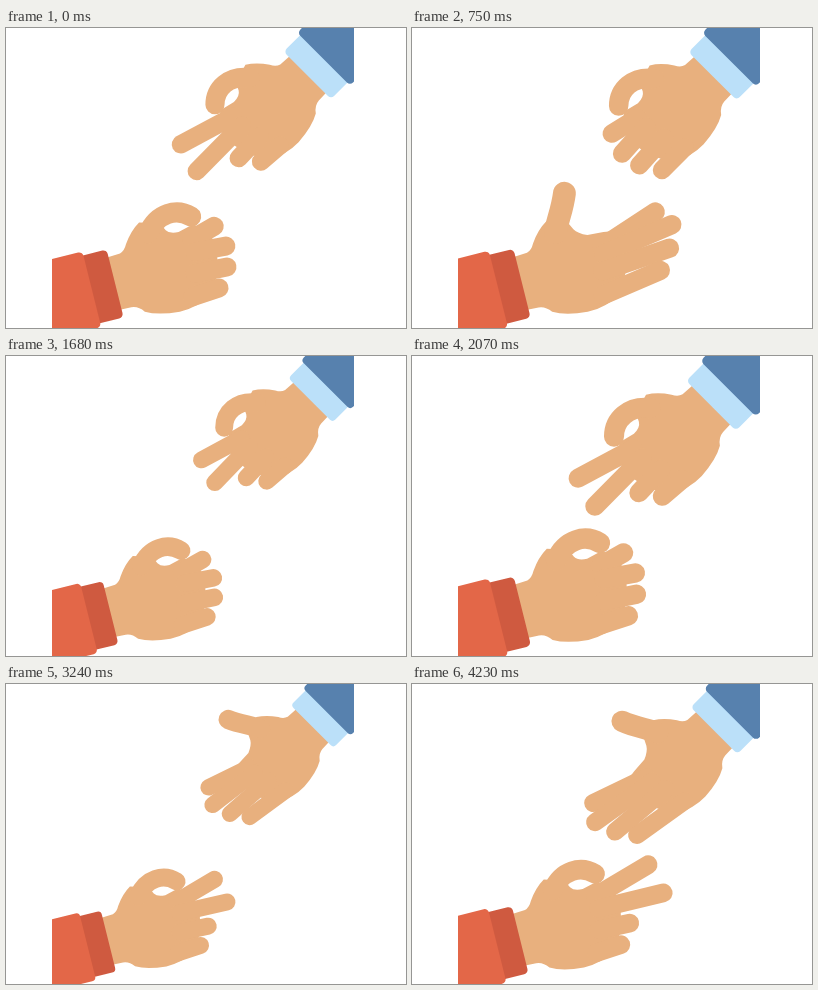
These frames come from a looping animation (400 px wide and 300 px high, 4.53 s). An HTML page with a canvas:

```html
<!DOCTYPE html>
<html lang="en">
<head>
<meta charset="utf-8">
<title>Rock paper scissors</title>
<style>
html, body { margin: 0; width: 100%; height: 100%; overflow: hidden; background: #fff; }
canvas { display: block; width: 400px; height: 300px; }
</style>
</head>
<body>
<canvas id="stage" width="400" height="300"></canvas>
<script>
const ctx = document.getElementById('stage').getContext('2d');
const LOOP = 4530, LAST = 4230, STEP = 30;
const SKIN = '#e8b07e';

// Fingertips from index to little finger, wrist at the origin
const TIPS = {
  rock: [[110, -31], [116.5, -9], [112.5, 11.5], [99.7, 30]],
  loose: [[115, -31], [122, -9], [118, 12], [105, 32]],
  paper: [[145, -36], [158, -20], [150, 2], [136, 21]],
  scissors: [[144.5, -42], [152.5, -10.5], [112, 11], [98, 30]]
};
const BASES = [[85, -24], [85, -11], [80, 10], [72, 32]];
const FLAT_BASES = [[85, -15], [85, -8], [80, 8], [75, 31]];
const BENT_THUMB = [[44, -40], [58, -58], [78, -58], [90, -46]];
const OPEN_THUMB = [[44, -40], [48, -50], [56, -60], [62, -75.5]];

// keys: time, size, how far the fingers are out
const red = {
  x: 46, y: 271.5, wrist: [63, -16.5], turn: -14, size: 1, flip: 1,
  sleeve: '#e36748', cuff: '#cf5a40',
  poses: [[0, 'rock'], [190, 'paper'], [1330, 'rock'], [2700, 'scissors']],
  keys: [
    [0, 1, 1], [190, 0.1, 0], [390, 0.895, 0.5], [650, 1.02, 1], [900, 0.99, 0.9],
    [1170, 0.64, 0.17], [1330, 0.1, 0], [1620, 0.9, 0.6], [2070, 1.02, 1],
    [2400, 0.97, 0.9], [2700, 0.1, 0], [2760, 0.26, 0], [3120, 0.85, 0.5],
    [3600, 0.965, 0.9], [4230, 0.985, 1]
  ]
};
const blue = {
  x: 348, y: 0, wrist: [-47, 47], turn: 135, size: 0.957, flip: -1,
  sleeve: '#5781ae', cuff: '#bbe0f9',
  poses: [[0, 'scissors'], [190, 'loose'], [1330, 'scissors'], [2700, 'paper']],
  keys: [
    [0, 1, 1], [190, 0.15, 0], [390, 0.82, 1], [650, 1.02, 1], [900, 1, 1],
    [1170, 0.71, 1], [1330, 0.15, 0], [1620, 0.9, 0.6], [2070, 1.05, 1],
    [2400, 0.98, 0.9], [2700, 0.15, 0], [2760, 0.35, 0.2], [3120, 0.86, 0.6],
    [3600, 0.96, 0.97], [4230, 0.985, 1]
  ]
};

const mix = (a, b, k) => a + (b - a) * k;
const mixPt = (a, b, k) => [mix(a[0], b[0], k), mix(a[1], b[1], k)];

// Smooth curve through the keys, flat at every turning point
function track(keys, t, col) {
  let i = 0;
  while (i < keys.length - 2 && t >= keys[i + 1][0]) i++;
  const rate = j => keys[j] && keys[j + 1]
    ? (keys[j + 1][col] - keys[j][col]) / (keys[j + 1][0] - keys[j][0]) : 0;
  const slope = j => {
    const a = rate(j - 1), b = rate(j);
    return a * b > 0 ? 2 * a * b / (a + b) : 0;
  };
  const [a, b] = [keys[i], keys[i + 1]];
  const d = b[0] - a[0], u = (t - a[0]) / d, w = 1 - u;
  return (1 + 2 * u) * w * w * a[col] + u * w * w * d * slope(i)
    + u * u * (3 - 2 * u) * b[col] - u * u * w * d * slope(i + 1);
}

function box(x, y, w, h, color) {
  ctx.fillStyle = color;
  ctx.beginPath();
  ctx.roundRect(x, y, w, h, 4.5);
  ctx.fill();
}

function palm(open) {
  ctx.beginPath();
  ctx.moveTo(-5, -26.5);
  ctx.lineTo(12, -27.5);
  ctx.quadraticCurveTo(17, -29, 20, -35);
  ctx.quadraticCurveTo(28, -47, 38, -53);
  ctx.lineTo(58, -47);
  ctx.lineTo(62, -39);
  ctx.quadraticCurveTo(65, -34, 74, mix(-34, -30, open));
  ctx.lineTo(90, mix(-38, -29, open));
  ctx.lineTo(104, -27);
  ctx.lineTo(107, -8);
  ctx.lineTo(103, 12);
  ctx.lineTo(92, 34);
  ctx.quadraticCurveTo(74, 44, 56, 43.5);
  ctx.quadraticCurveTo(34, 42, 22, 35);
  ctx.quadraticCurveTo(17, 28, 10, 27.5);
  ctx.lineTo(-5, 27);
  ctx.fill();
}

function hand(pose, out) {
  const flat = pose === 'paper' ? out : 0;
  const open = 1 - (1 - flat) ** 2.5;
  ctx.fillStyle = ctx.strokeStyle = SKIN;
  ctx.lineCap = ctx.lineJoin = 'round';
  palm(open);

  ctx.lineWidth = 19;
  BASES.forEach((base, i) => {
    ctx.beginPath();
    ctx.moveTo(...mixPt(base, FLAT_BASES[i], flat));
    ctx.lineTo(...mixPt(TIPS.rock[i], TIPS[pose][i], out));
    ctx.stroke();
  });

  const thumb = BENT_THUMB.map((p, i) => mixPt(p, OPEN_THUMB[i], open));
  ctx.lineWidth = mix(20, 22.5, open);
  ctx.beginPath();
  ctx.moveTo(...thumb[0]);
  ctx.bezierCurveTo(...thumb[1], ...thumb[2], ...thumb[3]);
  ctx.stroke();
}

function arm(a, t) {
  const s = track(a.keys, t, 1), out = track(a.keys, t, 2);
  const pose = a.poses.filter(p => p[0] <= t).pop()[1];
  ctx.save();
  ctx.translate(a.x, a.y);
  ctx.scale(s, s);
  ctx.translate(...a.wrist);
  ctx.rotate(a.turn * Math.PI / 180);
  ctx.scale(a.size, a.size * a.flip);
  hand(pose, out);
  box(-30, -34.5, 30, 70, a.cuff);
  box(-190, -38.5, 166, 78, a.sleeve);
  ctx.restore();
}

function draw(t) {
  ctx.fillStyle = '#fff';
  ctx.fillRect(0, 0, 400, 300);
  ctx.save();
  ctx.beginPath();
  ctx.rect(46, 0, 302, 300);
  ctx.clip();
  arm(red, t);
  arm(blue, t);
  ctx.restore();
}

const start = performance.now();
function tick() {
  const t = (performance.now() - start) % LOOP;
  draw(Math.min(LAST, Math.floor(t / STEP) * STEP));
  requestAnimationFrame(tick);
}
tick();
</script>
</body>
</html>
```
